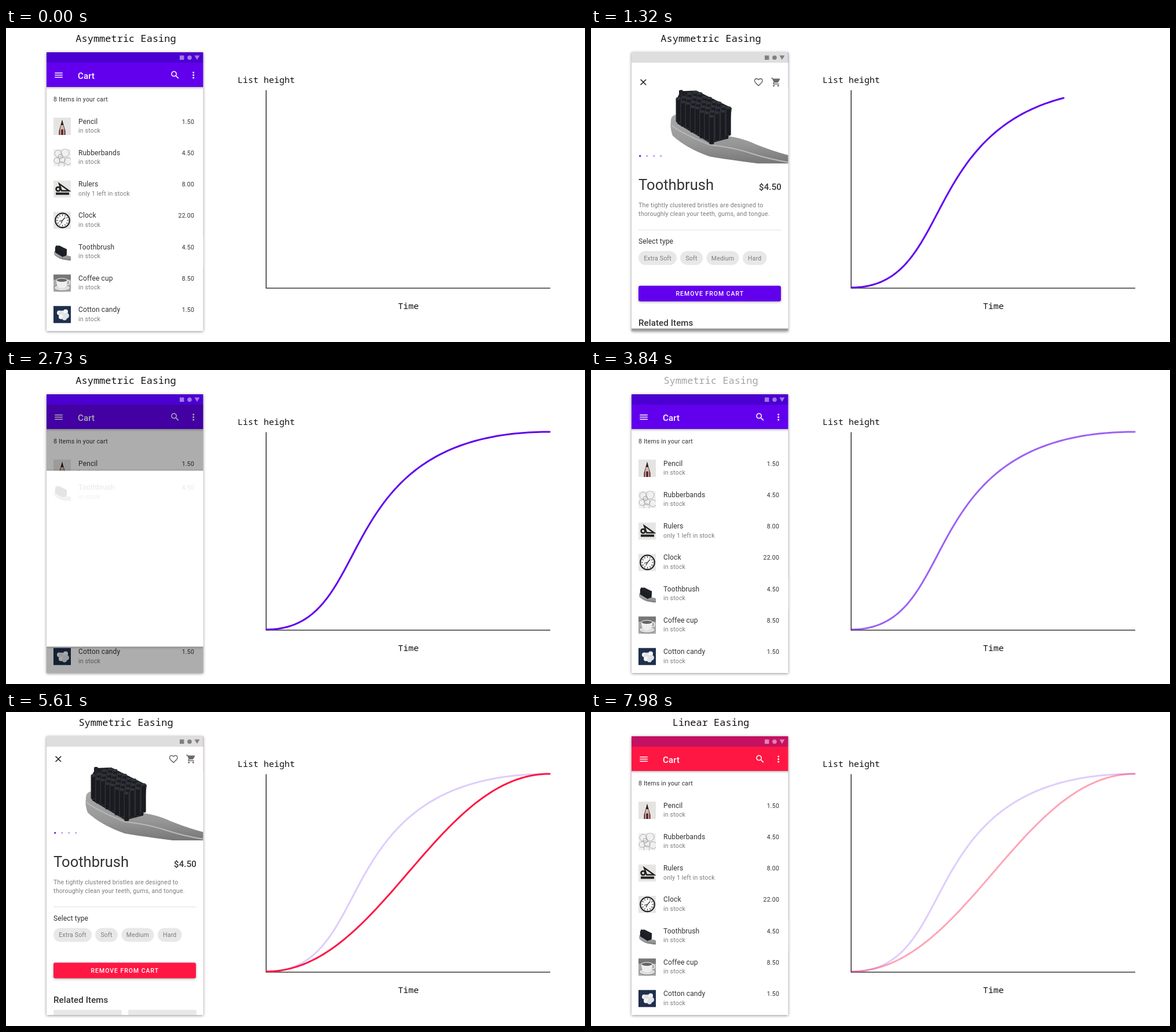
Recreate the animation shown at these times as an HTML page. Size 1000 px wide and 543 px high, loop 8000 ms.

```html
<!DOCTYPE html>
<html lang="en">
<head>
<meta charset="utf-8">
<title>Easing comparison</title>
<style>
html, body { margin: 0; width: 100%; height: 100%; overflow: hidden; background: #fff; }
#stage { display: block; width: 100vw; height: 100vh; }
text { font: 10.54px Roboto, sans-serif; letter-spacing: .19px; fill: #333; }
.mono { font: 15px "Noto Sans Mono", "DejaVu Sans Mono", monospace; letter-spacing: 0; fill: #111; }
#title { font-size: 17px; }
.mid { text-anchor: middle; }
.end { text-anchor: end; }
.name { font-size: 12.05px; letter-spacing: .11px; }
.head { font-size: 15.06px; font-weight: 500; letter-spacing: .11px; }
.big { font-size: 25.6px; letter-spacing: 0; }
.soft { fill: #7c7c7c; }
.button { font-weight: 500; letter-spacing: .94px; fill: #fff; }
.main { fill: var(--main); }
.raised { filter: drop-shadow(0 1.5px 2px rgba(0,0,0,.35)); }
.curve { fill: none; stroke-width: 3; stroke-linecap: round; stroke-linejoin: round; }
</style>
</head>
<body>
<svg id="stage" viewBox="0 0 1000 543"></svg>
<script>
const icons = {
  menu: "M3 18h18v-2H3zm0-5h18v-2H3zm0-7v2h18V6z",
  search: "M15.5 14h-.79l-.28-.27A6.47 6.47 0 0 0 16 9.5 6.5 6.5 0 1 0 9.5 16c1.61 0 3.09-.59 4.23-1.57l.27.28v.79l5 4.99L20.49 19zm-6 0C7.01 14 5 11.99 5 9.5S7.01 5 9.5 5 14 7.01 14 9.5 11.99 14 9.5 14z",
  more: "M12 8a2 2 0 1 0 0-4 2 2 0 1 0 0 4zm0 6a2 2 0 1 0 0-4 2 2 0 1 0 0 4zm0 6a2 2 0 1 0 0-4 2 2 0 1 0 0 4z",
  close: "M19 6.41L17.59 5 12 10.59 6.41 5 5 6.41 10.59 12 5 17.59 6.41 19 12 13.41 17.59 19 19 17.59 13.41 12z",
  heart: "M16.5 3c-1.74 0-3.41.81-4.5 2.09C10.91 3.81 9.24 3 7.5 3 4.42 3 2 5.42 2 8.5c0 3.78 3.4 6.86 8.55 11.54L12 21.35l1.45-1.32C18.6 15.36 22 12.28 22 8.5 22 5.42 19.58 3 16.5 3zm-4.4 15.55l-.1.1-.1-.1C7.14 14.24 4 11.39 4 8.5 4 6.5 5.5 5 7.5 5c1.54 0 3.04.99 3.57 2.36h1.87C13.46 5.99 14.96 5 16.5 5c2 0 3.5 1.5 3.5 3.5 0 2.89-3.14 5.74-7.9 10.05z",
  cart: "M7 18a2 2 0 1 0 0 4 2 2 0 1 0 0-4zM1 2v2h2l3.6 7.59-1.35 2.45C4.52 15.37 5.48 17 7 17h12v-2H7.42a.25.25 0 0 1-.22-.37l.9-1.63h7.45c.75 0 1.41-.41 1.75-1.03l3.58-6.49A1 1 0 0 0 20 4H5.21l-.94-2zm16 16a2 2 0 1 0 0 4 2 2 0 1 0 0-4z"
};
const list = (n, fn) => Array.from({length: n}, (_, i) => fn(i)).join("");
const rect = (x, y, w, h, fill, more = "") => `<rect x="${x}" y="${y}" width="${w}" height="${h}" fill="${fill}" ${more}/>`;
const circle = (x, y, r, fill, more = "") => `<circle cx="${x}" cy="${y}" r="${r}" fill="${fill}" ${more}/>`;
const path = (d, fill, more = "") => `<path d="${d}" fill="${fill}" ${more}/>`;
const text = (x, y, str, cls = "") => `<text x="${x}" y="${y}" class="${cls}">${str}</text>`;
const icon = (name, x, y, fill) => path(icons[name], fill, `transform="translate(${x - 9} ${y - 9}) scale(.753)"`);

// Bristle tufts run along the head, back row first
const tufts = list(4, r => list(8, c => {
  const x = 180 - 9.7 * r + 8.2 * c, y = 97 + 4.3 * r + 4.1 * c - (c + r) % 2 * 2;
  return rect(x - 4, y, 8, 43 + c, "#191b20", 'rx="2" stroke="#3d4046" stroke-width=".7"') +
    `<ellipse cx="${x}" cy="${y + 2}" rx="3.4" ry="2.2" fill="#30333a"/>`;
}));
const brush = path("M138 150Q137 138 150 137L238 175Q262 178 285 189Q315 201 342 208V222H288Q240 216 205 210Q165 196 141 174Q136 160 138 150Z", "url(#grey)") +
  path("M139 156Q160 172 206 190Q245 194 275 204T342 220", "none", 'stroke="#b9b9b9" stroke-width="2"') +
  path("M147 112L155 97L182 96L243 126L237 179L206 187L149 153Z", "#191b20") +
  [155, 164, 172].map((x, i) => rect(x - 3, 95 + i * 3, 7, 30, "#202227", 'rx="2"')).join("") + tufts;

const thumbs = [
  rect(0, 0, 30, 30, "#e6e4e3") + path("M15 4L20.500 23V30H9.500V23Z", "#2b2527") + path("M13 13h4l2 9-4-2-4 2z", "#d9b9a6") +
    path("M11 22l2.500-2v10H11zM16.500 20l2.500 2v8h-2.500z", "#e58b8b") + path("M15 4l2 9h-4z", "#222"),
  rect(0, 0, 30, 30, "#f0f0f0") + [[8, 8, 6], [20, 7, 7], [6, 20, 5], [15, 19, 5], [25, 21, 6], [14, 27, 5], [12, 13, 4]]
    .map(([x, y, r]) => circle(x, y, r, "none", 'stroke="#999" stroke-width=".8"')).join(""),
  rect(0, 0, 30, 30, "#e7e6e5") + path("M10 6L27 18H14Z", "none", 'stroke="#222" stroke-width="2.4"') +
    circle(8, 15, 3.4, "none", 'stroke="#222" stroke-width="2.8"') + rect(4, 21, 23, 4, "#222"),
  rect(0, 0, 30, 30, "#e5e5e4") + circle(15.500, 15, 12.300, "#fafafa", 'stroke="#222" stroke-width="2.200"') +
    list(12, i => rect(15, 4.500, 1, 2.600, "#222", `transform="rotate(${i * 30} 15.500 15)"`)) +
    path("M13 20L15.500 15L20 10M15.500 15L10 16.500", "none", 'stroke="#222" stroke-width="1.200"'),
  `<svg width="30" height="30" viewBox="133 75 143 143"><use href="#brush"/></svg>`,
  rect(0, 0, 30, 30, "#aaa") + rect(0, 0, 30, 9, "#777") + `<ellipse cx="15" cy="23" rx="14" ry="5.500" fill="#ddd" stroke="#777"/>` +
    circle(24, 14, 4, "none", 'stroke="#eee" stroke-width="1.600"') + path("M5 10H24Q24 24 14.500 24T5 10Z", "#eee") +
    `<ellipse cx="14.500" cy="10" rx="9.500" ry="3.300" fill="#666" stroke="#fff"/>`,
  rect(0, 0, 30, 30, "#1f2f4d") + [[10, 12, 4], [15, 14, 6], [21, 10, 4], [22, 17, 5], [13, 19, 4], [19, 21, 4]]
    .map(([x, y, r], i) => circle(x, y, r, i % 2 ? "#dfe3e8" : "#f6f6f6")).join("")
];
const items = [["Pencil", "1.50"], ["Rubberbands", "4.50"], ["Rulers", "8.00", "only 1 left in stock"], ["Clock", "22.00"],
  ["Toothbrush", "4.50"], ["Coffee cup", "8.50"], ["Cotton candy", "1.50"]];
const row = i => {
  const [name, price, stock = "in stock"] = items[i];
  return `<g transform="translate(0 ${54.25 * i})"><svg x="82" y="155" width="30" height="30">${thumbs[i]}</svg>` +
    text(125, 165.5, name, "name") + text(125, 181, stock, "soft") + text(325, 165.5, price, "end") + "</g>";
};
const statusIcons = fill => `<g fill="${fill}"><path d="M300 47.500h7.500v7.500h-7.500zM325.500 47.500h9l-4.500 7.500z"/><circle cx="317" cy="51.300" r="3.800"/></g>`;
const chips = [["Extra Soft", 82, 66], ["Soft", 154, 39], ["Medium", 199.5, 56], ["Hard", 262, 41.5]];

const detail = '<use href="#brush"/>' +
  circle(90, 81, 0, "#000", 'id="tap" opacity=".1"') +
  icon("close", 90.3, 81.3, "#222") + icon("heart", 289.3, 81.3, "#6b6b6b") + icon("cart", 319.5, 81.3, "#6b6b6b") +
  list(4, i => circle(84.7 + 12 * i, 209, 1.6, "#6200ee", `opacity="${i ? .4 : 1}"`)) +
  text(82, 267.5, "Toothbrush", "big") + text(329, 267.7, "$4.50", "head end") +
  text(82, 298, "The tightly clustered bristles are designed to", "soft") +
  text(82, 313, "thoroughly clean your teeth, gums, and tongue.", "soft") +
  rect(82, 336.5, 247, 1, "#e0e0e0") + text(82, 361, "Select type", "name") +
  chips.map(([s, x, w]) => rect(x, 373.5, w, 24, "#e8e8e8", 'rx="12"') + text(x + w / 2, 389.3, s, "mid soft")).join("") +
  rect(82, 433.5, 246, 27, "", 'rx="3" class="main raised" style="fill:var(--main)"') +
  text(205.3, 450.8, "REMOVE FROM CART", "button mid") +
  text(82, 502.5, "Related Items", "head") +
  rect(82, 515, 118, 60, "#e8e8e8", 'rx="3"') + rect(211, 515, 118, 60, "#e8e8e8", 'rx="3"');

const stage = document.getElementById("stage");
stage.innerHTML = `
<defs>
  <linearGradient id="grey" x2="0" y2="1"><stop stop-color="#aaa"/><stop offset=".6" stop-color="#979797"/><stop offset="1" stop-color="#777"/></linearGradient>
  <clipPath id="screen">${rect(70, 42, 270.5, 482, "#000")}</clipPath>
  <g id="brush">${brush}</g>
</defs>
${text(207, 24, "", "mono mid").replace("<text", '<text id="title"')}
${rect(70, 42, 270.5, 482, "#fff", 'style="filter:drop-shadow(0 1.5px 2.500px rgba(0,0,0,.45))"')}
<g clip-path="url(#screen)">
  ${text(82, 126.5, "8 Items in your cart")}${list(7, row)}
  ${rect(68, 60, 275, 42, "", 'class="main raised" style="fill:var(--main)"')}
  ${icon("menu", 91, 81.5, "#fff")}${icon("search", 292, 81.3, "#fff")}${icon("more", 323.7, 81.5, "#fff")}
  <text x="124" y="87.500" class="head" style="fill:#fff">Cart</text>
  ${rect(70, 60, 271, 464, "#000", 'id="scrim"')}
  ${rect(70, 360, 271, 54, "#fff", 'id="shadow" class="raised"')}
  <svg id="card" x="70" width="271">
    ${rect(0, 0, 271, 500, "#fff")}
    <g id="row">${circle(205, 387, 0, "#000", 'id="ripple" opacity=".08"')}${row(4)}</g>
    <g id="detail">${detail}</g>
  </svg>
  ${rect(70, 42, 271, 18, "", 'style="fill:var(--dark)"')}
  <g opacity=".48">${statusIcons("#fff")}</g>
  <g id="status">${rect(70, 42, 271, 18, "#dedede")}${statusIcons("#808080")}</g>
</g>
${text(400, 95, "List height", "mono")}${text(677, 485.5, "Time", "mono")}
<path d="M449.300 107.500V449.800H940" fill="none" stroke="#111" stroke-width="1.300"/>
<polyline id="curveA" class="curve" stroke="#6200ee"/>
<polyline id="curveB" class="curve" stroke="#ff1744"/>`;

const el = {};
stage.querySelectorAll("[id]").forEach(e => el[e.id] = e);
const set = (id, attrs) => { for (const k in attrs) el[id].setAttribute(k, attrs[k]); };
const ramp = (v, a, b) => Math.min(1, Math.max(0, (v - a) / (b - a)));
const mix = (a, b, k) => `rgb(${a.map((v, i) => Math.round(v + (b[i] - v) * k))})`;

// CSS-style cubic-bezier(x1, 0, x2, 1)
const bezier = (x1, x2) => x => {
  let lo = 0, hi = 1, s;
  for (let i = 0; i < 24; i++) {
    s = (lo + hi) / 2;
    if (3 * (1 - s) ** 2 * s * x1 + 3 * (1 - s) * s * s * x2 + s ** 3 < x) lo = s; else hi = s;
  }
  return s * s * (3 - 2 * s);
};
const SPAN = 900;
const rounds = [
  {ease: bezier(.4, .2), tap: 450, open: 646, plot: 646, back: 2190, close: 2444},
  {ease: bezier(.4, .6), tap: 4440, open: 4666, plot: 4694, back: 6270, close: 6485}
];
const titles = ["Asymmetric Easing", "Symmetric Easing", "Linear Easing"], swaps = [3790, 7840];

function plot(id, {ease, plot}, t, fade) {
  const u = ramp(t, plot, plot + SPAN);
  const points = Array.from({length: 81}, (_, i) => {
    const x = i / 80 * u;
    return `${(450 + 489 * x).toFixed(2)},${(448.7 - 341.7 * ease(x)).toFixed(2)}`;
  });
  set(id, {points: points.join(" "), opacity: u > 0 ? 1 - .8 * ramp(t, fade, fade + 380) : 0});
}

function draw(t) {
  const r = rounds[t < 4000 ? 0 : 1], opening = t < r.close;
  const x = ramp(t, opening ? r.open : r.close, (opening ? r.open : r.close) + SPAN);
  const q = x <= 0 ? 0 : x >= 1 ? 1 : r.ease(x), p = opening ? q : 1 - q;
  const top = 360 - 318 * p, height = 54 + 428 * p;

  set("card", {y: top, height});
  set("shadow", {y: top, height, opacity: ramp(p, 0, .15)});
  set("row", {transform: `translate(-70 ${-300 * p - top})`, opacity: opening ? 1 - ramp(p, 0, .25) : ramp(q, .36, .85)});
  set("detail", {transform: `translate(-70 ${300 * (1 - p) - top})`, opacity: opening ? ramp(p, .25, .8) : 1 - ramp(q, 0, .36)});
  set("scrim", {opacity: .32 * ramp(p, 0, .28)});
  set("status", {opacity: ramp(p, .7, .95)});
  set("ripple", {r: opening ? 190 * ramp(t, r.tap, r.tap + 300) : 0});
  set("tap", {r: 15 * ramp(t, r.back, r.back + 200)});

  const red = ramp(t, 3960, 4230);
  stage.style.setProperty("--main", mix([98, 0, 238], [255, 23, 68], red));
  stage.style.setProperty("--dark", mix([75, 0, 209], [197, 17, 98], red));

  el.title.textContent = titles[swaps.filter(s => t >= s).length];
  set("title", {opacity: Math.min(1, ...swaps.map(s => Math.abs(t - s) / 130))});
  plot("curveA", rounds[0], t, 3660);
  plot("curveB", rounds[1], t, 7690);
}

const start = performance.now();
function tick() {
  const t = (performance.now() - start) % 8000;
  draw(Math.floor(t / 30) * 30);
  requestAnimationFrame(tick);
}
tick();
</script>
</body>
</html>
```
